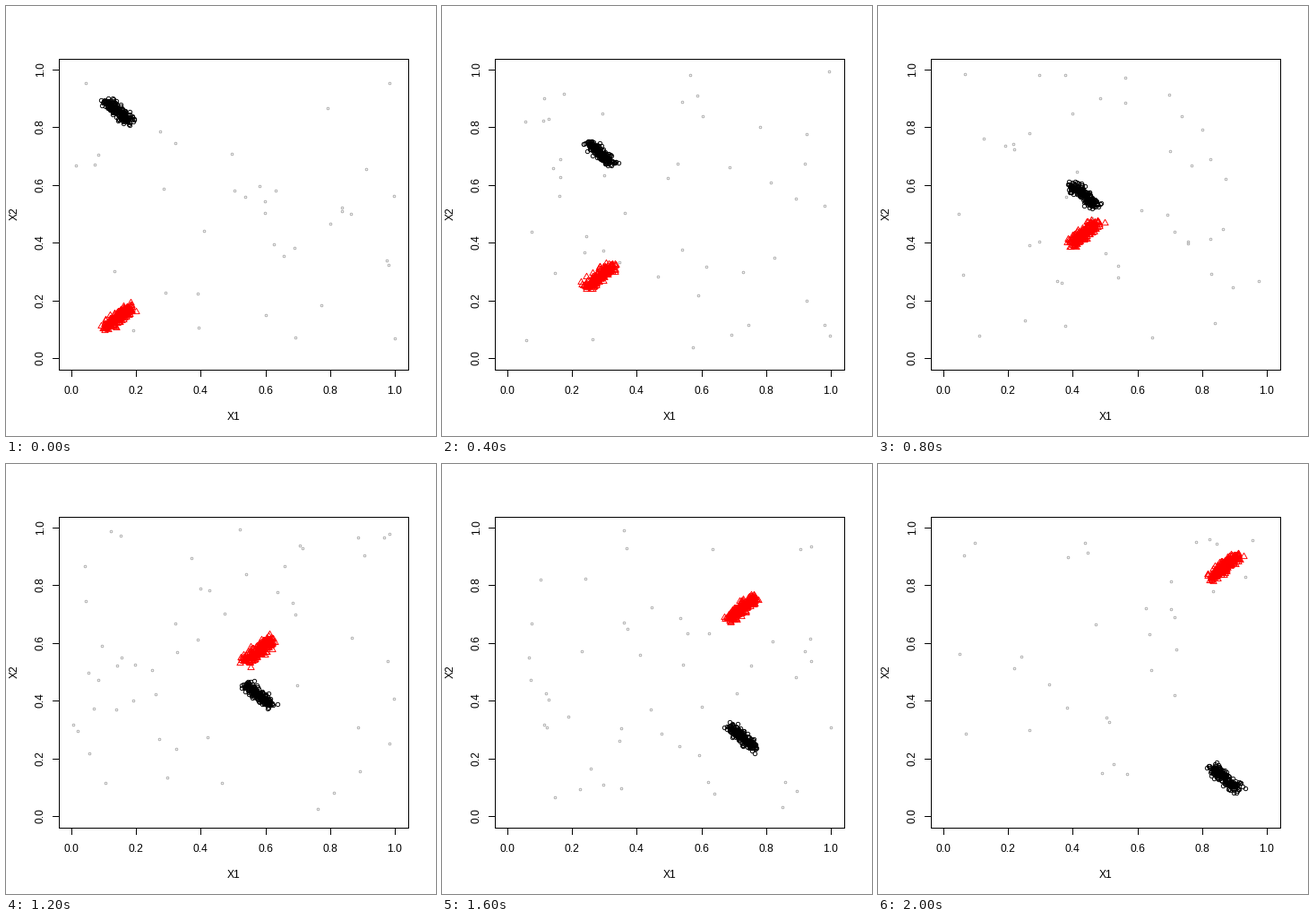
These frames come from a looping animation (480 px wide and 480 px high, 2.2 s). A matplotlib script:

```python
import matplotlib
import matplotlib.pyplot as plt
import numpy as np
from matplotlib.animation import FuncAnimation
from matplotlib.path import Path

matplotlib.rcParams["font.family"] = "Liberation Sans"

SIZE, DPI = 480, 96
PX = 72 / DPI                      # points per pixel
LEFT, RIGHT, TOP, BOTTOM = 59, 449, 59, 406
STEPS, STEP_MS = 11, 200
NOISE_COUNTS = [37, 43, 46, 45, 49, 50, 52, 42, 49, 40, 33]
CLUSTER_SIZE = 200


def to_px(x, y):
    return 73 + 361.8 * np.asarray(x), 393.4 - 321.8 * np.asarray(y)


fig = plt.figure(figsize=(SIZE / DPI, SIZE / DPI), dpi=DPI, facecolor="white")
ax = fig.add_axes([0, 0, 1, 1])
ax.set_xlim(0, SIZE)
ax.set_ylim(SIZE, 0)
ax.axis("off")


def stroke(xs, ys):
    ax.plot(xs, ys, color="black", lw=PX, antialiased=False,
            solid_capstyle="projecting", solid_joinstyle="miter")


def label(x, y, text, angle=0):
    ax.text(x, y, text, fontsize=12 * PX, rotation=angle, ha="center",
            va="baseline", rotation_mode="anchor")


def draw_axes():
    stroke([LEFT, RIGHT, RIGHT, LEFT, LEFT], [TOP, TOP, BOTTOM, BOTTOM, TOP])
    for v in np.arange(6) / 5:
        x, y = np.floor(to_px(v, v))
        stroke([x, x], [BOTTOM, BOTTOM + 7])
        stroke([LEFT, LEFT - 7], [y, y])
        label(x, 433, f"{v:.1f}")
        label(42, y, f"{v:.1f}", 90)
    label(254, 462, "X1")
    label(13, 232, "X2", 90)


def markers(shape, size, color):
    line, = ax.plot([], [], ls="none", marker=shape, markersize=size * PX,
                    markerfacecolor="none", markeredgecolor=color,
                    markeredgewidth=0.9 * PX)
    return line


def cluster(rng, cx, cy, slope):
    t = rng.uniform(-0.037, 0.037, CLUSTER_SIZE)
    x = cx + t + rng.normal(0, 0.010, CLUSTER_SIZE)
    y = cy + slope * t + rng.normal(0, 0.008, CLUSTER_SIZE)
    return to_px(x, y)


h = np.sqrt(3)
triangle = Path([(0, 2), (-h, -1), (h, -1), (0, 2)], closed=True)

draw_axes()
noise = markers("o", 2.6, "#a9a9a9")
circles = markers("o", 4.4, "black")
triangles = markers(triangle, 8.4, "red")


def update(i):
    rng = np.random.default_rng(100 + i)
    c = 0.141 + 0.0726 * i
    noise.set_data(*to_px(*rng.uniform(0, 1, (2, NOISE_COUNTS[i]))))
    circles.set_data(*cluster(rng, c, 1 - c, -1))
    triangles.set_data(*cluster(rng, c, c, 1))
    return noise, circles, triangles


anim = FuncAnimation(fig, update, frames=STEPS, interval=STEP_MS, repeat=True)
plt.show()
```
